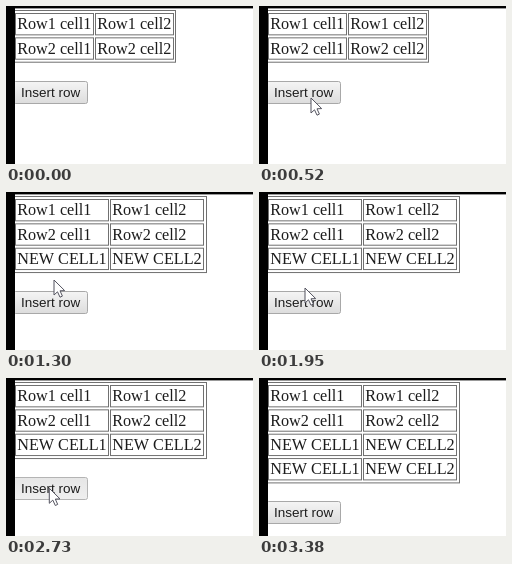
An HTML page with a canvas that plays this animation: 247 px wide and 158 px high, repeating every 4.68 s.

```html
<!DOCTYPE html>
<html lang="en">
<head>
<meta charset="utf-8">
<title>Insert row</title>
<style>
html, body { margin: 0; width: 100%; height: 100%; overflow: hidden; background: #fff; }
canvas { display: block; }
</style>
</head>
<body>
<canvas id="stage" width="247" height="158"></canvas>
<script>
const ctx = document.getElementById('stage').getContext('2d');
const LOOP = 4680, TICK = 130;
const ROW_H = 24.35, TOP = 4, LEFT = 9;

// Pointer path: time, x, y of the tip
const path = [
  [260, 55, 101], [520, 52, 92], [780, 48, 88], [1820, 48, 88],
  [1950, 46, 96], [2340, 43.3, 110.3], [3120, 43.3, 110.3], [3250, 42, 141]
];

function pointerAt(t) {
  if (t < path[0][0] || t >= 3380) return null;
  const next = path.findIndex(p => p[0] > t);
  if (next < 0) return path[path.length - 1].slice(1);
  const [t0, x0, y0] = path[next - 1], [t1, x1, y1] = path[next];
  const k = (t - t0) / (t1 - t0);
  return [x0 + (x1 - x0) * k, y0 + (y1 - y0) * k];
}

function box(x, y, w, h, color) {
  ctx.strokeStyle = color;
  ctx.lineWidth = 1;
  ctx.strokeRect(x + 0.5, y + 0.5, w - 1, h - 1);
}

function drawTable(rows) {
  const wide = rows > 2;
  const cellW = wide ? 94 : 79;
  const pitch = wide ? 95 : 80;
  const right = wide ? 201 : 170;
  box(6, TOP, right - 6, 4 + ROW_H * rows, '#707070');
  ctx.font = '16.2px "Liberation Serif", "Times New Roman", serif';
  for (let r = 0; r < rows; r++) {
    for (let c = 0; c < 2; c++) {
      const x = LEFT + c * pitch, y = TOP + 3 + r * ROW_H;
      box(x, y, cellW, ROW_H - 2, '#707070');
      const label = r < 2 ? `Row${r + 1} cell${c + 1}` : `NEW CELL${c + 1}`;
      ctx.fillStyle = '#1c1c1c';
      ctx.fillText(label, x + 2.2, y + 16.2);
    }
  }
}

function drawButton(y, pressed) {
  const shade = ctx.createLinearGradient(0, y, 0, y + 23);
  shade.addColorStop(0, pressed ? '#e6e6e6' : '#f5f5f5');
  shade.addColorStop(1, pressed ? '#efefef' : '#dcdcdc');
  ctx.beginPath();
  ctx.roundRect(7.5, y + 0.5, 74, 22, 2);
  ctx.fillStyle = shade;
  ctx.fill();
  ctx.strokeStyle = pressed ? '#b4b4b4' : '#a8a8a8';
  ctx.stroke();
  ctx.font = '13.5px "Liberation Sans", Arial, sans-serif';
  ctx.fillStyle = '#1c1c1c';
  ctx.fillText('Insert row', 15, y + 16);
}

function drawPointer(x, y) {
  ctx.save();
  ctx.translate(x, y);
  ctx.beginPath();
  [[0, 0], [0, 15], [3.5, 11.8], [6, 17.2], [8.4, 16.1], [6, 10.8], [10.7, 10.6]]
    .forEach(([px, py]) => ctx.lineTo(px, py));
  ctx.closePath();
  ctx.fillStyle = '#fff';
  ctx.fill();
  ctx.lineJoin = 'round';
  ctx.strokeStyle = '#53535f';
  ctx.stroke();
  ctx.restore();
}

function draw(t) {
  const rows = t < 1300 ? 2 : t < 2990 ? 3 : 4;
  const pressed = (t >= 1040 && t < 1300) || (t >= 2730 && t < 2990);
  ctx.fillStyle = '#fff';
  ctx.fillRect(0, 0, 247, 158);
  // Slightly soft, like a screen recording
  ctx.filter = 'blur(0.4px)';
  drawTable(rows);
  drawButton(27 + 24 * rows, pressed);
  const tip = pointerAt(t);
  if (tip) drawPointer(...tip);
  ctx.filter = 'none';
  ctx.fillStyle = '#000';
  ctx.fillRect(0, 0, 247, 2.4);
  ctx.fillRect(0, 0, 9, 158);
}

const start = performance.now();
function loop() {
  const t = (performance.now() - start) % LOOP;
  draw(Math.floor(t / TICK) * TICK);
  requestAnimationFrame(loop);
}
loop();
</script>
</body>
</html>
```
